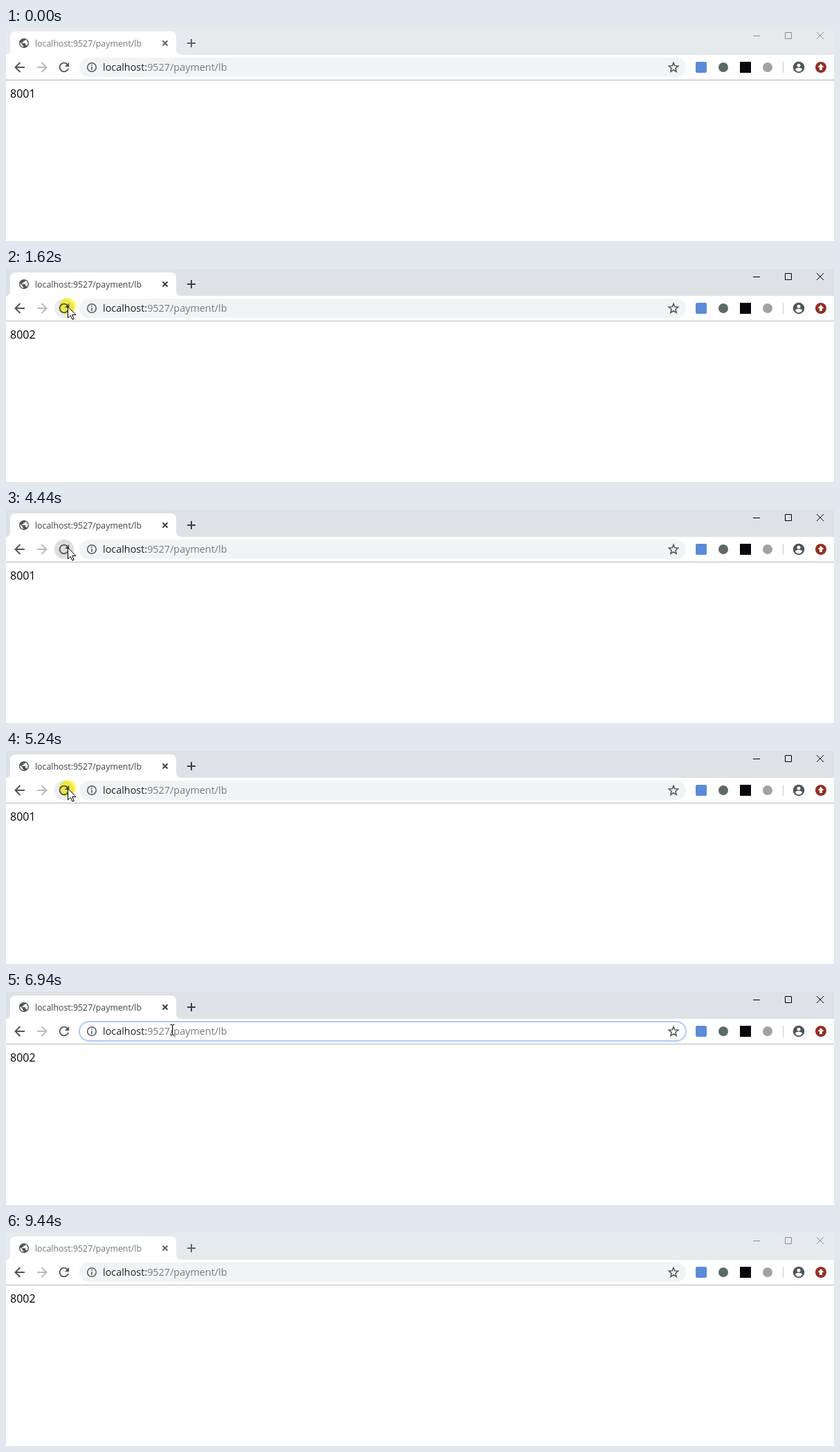
Write an HTML page that moves like this. It is 1197 px wide and 309 px high and loops after 9.59 s.

```html
<!DOCTYPE html>
<html lang="en">
<head>
<meta charset="utf-8">
<title>Browser reload</title>
<style>
html, body { margin: 0; width: 100%; height: 100%; overflow: hidden; background: #fff; }
svg { display: block; width: 1197px; height: 309px; font-family: "Open Sans", "Noto Sans", sans-serif; }
text { white-space: pre; }
.line { fill: none; stroke: #50555a; stroke-width: 2; }
.icon { fill: #50555a; }
#strip { fill: #dee1e6; }
#tab { fill: #3c4043; }
#tabMarks { stroke: #3c4043; }
#controls { stroke: #000; stroke-width: 1; fill: none; }
.idle #strip { fill: #e7eaed; }
.idle #tab { fill: #72767a; }
.idle #tabMarks { stroke: #5f6368; }
.idle #controls { stroke: #8c8e90; }
#glow { fill: #fff75a; mix-blend-mode: multiply; }
</style>
</head>
<body>
<svg id="stage" viewBox="0 0 1197 309">
  <defs><clipPath id="selClip"><rect id="clipBox" y="47" height="20"/></clipPath></defs>

  <!-- tab strip -->
  <rect id="strip" width="1197" height="39"/>
  <path fill="#fff" d="M0 39q6 0 6-8V13q0-8 8-8H238q8 0 8 8V31q0 8 8 8z"/>
  <path class="icon" transform="translate(17.6 13.6) scale(.7)" d="M12 2C6.48 2 2 6.48 2 12s4.48 10 10 10 10-4.48 10-10S17.52 2 12 2zm-1 17.93c-3.95-.49-7-3.85-7-7.93 0-.62.08-1.21.21-1.79L9 15v1c0 1.1.9 2 2 2v1.93zm6.9-2.54c-.26-.81-1-1.39-1.9-1.39h-1v-3c0-.55-.45-1-1-1H8v-2h2c.55 0 1-.45 1-1V7h2c1.1 0 2-.9 2-2v-.41c2.93 1.19 5 4.06 5 7.41 0 2.08-.8 3.97-2.1 5.39z"/>
  <text id="tab" x="42" y="27" font-size="12.35">localhost:9527/payment/lb</text>
  <path id="tabMarks" class="line" d="M226.5 18.5l7 7m0-7l-7 7M262 22h12m-6-6v12"/>
  <path id="controls" d="M1080 11.5h10M1126.5 6.5h9v9h-9zM1172 6l10 10m0-10l-10 10"/>

  <!-- toolbar -->
  <path stroke="#b5b9b5" d="M0 75.5H1197"/>
  <path class="line" d="M27 57H14M20.5 50l-7 7 7 7"/>
  <path class="line" style="stroke:#b8babd" d="M45 57H58M51.500 50l7 7-7 7"/>
  <circle id="hover" cx="84" cy="57" r="14"/>
  <path class="icon" transform="translate(73.200 46.200) scale(.9)" d="M17.65 6.35C16.2 4.9 14.21 4 12 4c-4.42 0-7.99 3.58-7.99 8s3.57 8 7.99 8c3.73 0 6.84-2.55 7.73-6h-2.08c-.82 2.33-3.04 4-5.65 4-3.31 0-6-2.69-6-6s2.69-6 6-6c1.66 0 3.14.69 4.22 1.78L13 11h7V4l-2.35 2.35z"/>
  <rect id="box" x="106" y="43" width="877" height="28" rx="14" stroke-width="2"/>
  <circle class="line" style="stroke-width:1.500" cx="124" cy="57" r="6.300"/>
  <path class="line" style="stroke-width:1.600" d="M124 53v1.700m0 1.500v4.600"/>
  <path class="line" transform="translate(956 48) scale(.75)" d="M21 9.500l-6.700-.6L12 3 9.700 8.900 3 9.500l5 4.500-1.500 6.500L12 17l5.500 3.500L16 14z"/>
  <rect id="sel" y="47" height="20" fill="#0078d7"/>
  <g font-size="14.4">
    <text x="140" y="62" fill="#777b80"><tspan fill="#202124">localhost:</tspan>9527/payment/lb</text>
    <text x="140" y="62" fill="#fff" clip-path="url(#selClip)">localhost:9527/payment/lb</text>
  </g>

  <!-- extensions and menu -->
  <rect x="997" y="49" width="16" height="16" rx="2" fill="#5b8bd8"/>
  <circle cx="1037" cy="57" r="7" fill="#5d6869"/>
  <rect x="1061" y="49" width="16" height="16" fill="#08080c"/>
  <circle cx="1101" cy="57" r="7" fill="#a0a2a3"/>
  <path stroke="#c6c9cc" d="M1123.500 49v16"/>
  <circle class="icon" cx="1146" cy="57" r="8.300"/>
  <circle cx="1146" cy="54.200" r="2.500" fill="#fff"/>
  <path fill="#fff" d="M1141 60.500q0-2.700 5-2.700t5 2.700q-2 2.800-5 2.800t-5-2.800z"/>
  <circle cx="1178" cy="57" r="8" fill="#932e24"/>
  <path fill="#fff" d="M1178 52l4.500 5h-2.500v4h-4v-4h-2.500z"/>

  <text id="port" x="6" y="101" font-size="16"></text>

  <circle id="glow" r="12"/>
  <path id="arrow" fill="#fff" stroke="#000" d="M.5.500V17l3.800-3.600 2.600 5.900 2.400-1L6.700 12.500H12z"/>
  <path id="beam" fill="none" stroke="#000" d="M-3-7.500h2.500l.5.500.5-.5H3M0-7V7M-3 7.500h2.500L0 7l.5.500H3"/>
</svg>
<script>
const LOOP = 9590, STEP = 80;
const $ = id => document.getElementById(id);
const set = (id, attrs) => { for (const k in attrs) $(id).setAttribute(k, attrs[k]); };
const show = (id, on) => set(id, { visibility: on ? 'visible' : 'hidden' });
const place = (id, p) => set(id, { transform: `translate(${p.x} ${p.y})` });
const within = (t, a, b) => t >= a && t < b;

// press and release times of each reload click
const clicks = [[920, 1080], [1620, 1800], [2240, 2390], [2770, 2940], [3330, 3500], [3800, 3960], [4110, 4280]];
for (let t = 4360; t <= 5000; t += 160) clicks.push([t, t + 80]);
clicks.push([5240, 5300]);
const presses = [...clicks, [5840, 5920], [7020, 8030]];

const easeOut = u => 1 - (1 - u) ** 2;
const easeInOut = u => u * u * (3 - 2 * u);

// the pointer is sampled in steps, as in a screen recording
function move(t, start, end, a, b, ease) {
  const sampled = Math.floor((t - start) / STEP + 0.01) * STEP;
  const k = ease(Math.max(0, Math.min(1, sampled / (end - start))));
  return { x: Math.round(a[0] + (b[0] - a[0]) * k), y: Math.round(a[1] + (b[1] - a[1]) * k) };
}

function pointer(t) {
  if (t < 130) return { kind: '', x: 0, y: 0 };
  if (t < 600) return { kind: 'arrow', ...move(t, 130, 450, [872, 276], [97, 69], easeOut) };
  if (t < 690) return { kind: 'arrow', x: 93, y: 61 };
  if (t < 5470) return { kind: 'arrow', x: 89, y: 54 };
  if (t < 5530) return { kind: 'arrow', x: 150, y: 53 };
  if (t < 5700) return { kind: '', x: 240, y: 54 };
  if (t < 5920) return { kind: 'beam', x: 240.5, y: 54 };
  if (t < 6240) return { kind: '', x: 238, y: 53 };
  if (t < 6390) return { kind: 'arrow', x: 238, y: 53 };
  if (t < 8030) {
    const p = move(t, 6940, 7710, [240, 55], [206, 53], easeInOut);
    return { kind: 'beam', x: p.x + .5, y: p.y };
  }
  if (t < 8740) return { kind: 'arrow', ...move(t, 8030, 8670, [206, 53], [904, 296], easeInOut) };
  return { kind: '', x: 0, y: 0 };
}

function selection(t, x) {
  if (within(t, 5920, 6390)) return [140, 321];
  if (!within(t, 7020, 9440)) return [0, 0];
  const digit = 8.25;
  const left = t < 8030 ? 204 + digit * Math.round((x - 204) / digit) : 204;
  return [Math.min(left, 237), 237];
}

function draw(t) {
  const p = pointer(t);
  const pressed = presses.some(([a, b]) => within(t, a, b));
  const loads = clicks.filter(c => c[1] <= t).length;
  const focused = within(t, 5840, 9440);

  $('stage').classList.toggle('idle', t < 920 || t >= 9440);
  $('port').textContent = 8001 + loads % 2;

  show('hover', within(t, 450, 5840));
  set('hover', { fill: within(t, 4280, 5240) && !pressed ? '#dcddde' : '#ecedee' });
  set('box', {
    fill: focused ? '#fff' : within(t, 5530, 5840) ? '#e8eaed' : '#f1f3f4',
    stroke: focused ? '#aecbfa' : 'none'
  });

  const [from, to] = selection(t, p.x);
  for (const id of ['sel', 'clipBox']) set(id, { x: from, width: to - from });

  for (const kind of ['arrow', 'beam']) {
    show(kind, p.kind === kind);
    place(kind, p);
  }
  show('glow', pressed);
  place('glow', p);
}

const begin = performance.now();
function tick() {
  draw((performance.now() - begin) % LOOP);
  requestAnimationFrame(tick);
}
tick();
</script>
</body>
</html>
```
